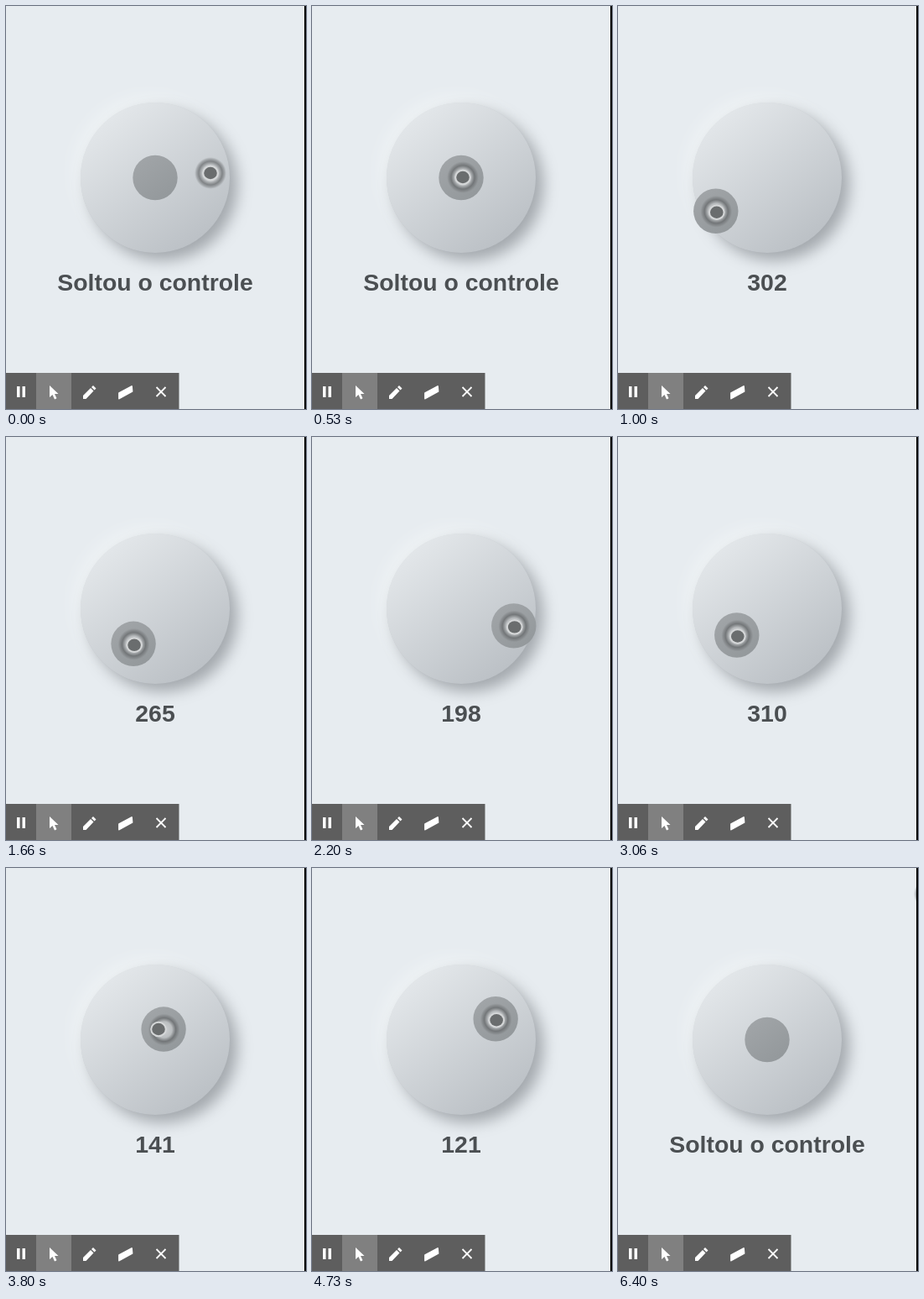
An HTML page with a canvas for the animation above (7060 ms loop, 358 by 480 pixels).

```html
<!DOCTYPE html>
<html lang="pt">
<head>
<meta charset="utf-8">
<style>
  html, body { margin: 0; width: 100%; height: 100%; overflow: hidden; background: #e7ecf0; }
  canvas { display: block; }
</style>
</head>
<body>
<canvas id="stage" width="358" height="480"></canvas>
<script>
const ctx = document.getElementById('stage').getContext('2d');
const LOOP = 7060;
const CX = 178, CY = 204.5;

// Knob turns: [step, reading in degrees, distance from centre]; a step is 1/15 s.
const turns = [
  [8, 90, 0], [14, 302, 62], [15, 327, 73], [22, 192, 42],
  [32, 558, 66], [33, 558, 66], [45, 1030, 51], [46, 1039, 48],
  [56, 1221, 44], [57, 1209, 16], [65, 1202, 0], [66, 1202, 8],
  [70, 1201, 29], [71, 1229, 48], [75, 1229, 48], [78, 1229, 0]
];

const clamp01 = u => Math.min(1, Math.max(0, u));
const mix = (a, b, u) => a + (b - a) * u;

function polarAt(step) {
  const i = turns.findIndex(turn => turn[0] > step);
  if (i < 1) return { reading: 0, radius: 0 };
  const [start, fromReading, fromRadius] = turns[i - 1];
  const [end, toReading, toRadius] = turns[i];
  const u = (step - start) / (end - start);
  return { reading: mix(fromReading, toReading, u), radius: mix(fromRadius, toRadius, u) };
}

function knobAt(step) {
  const { reading, radius } = polarAt(step);
  const angle = reading * Math.PI / 180;
  return { x: CX - radius * Math.cos(angle), y: CY - radius * Math.sin(angle) };
}

function glide(step, start, end, x0, y0, x1, y1) {
  const u = clamp01((step - start) / (end - start));
  const eased = u * u * (3 - 2 * u);
  return { x: mix(x0, x1, eased), y: mix(y0, y1, eased) };
}

function pointerAt(step, knob) {
  if (step < 9) return glide(step, 3, 8, 244, 199, 180, 204);
  if (step > 56 && step < 66) return glide(step, 57, 65, 182, 192, 182, 200);
  if (step > 71) return glide(step, 86, 96, 219, 181, 372, 31);
  return { x: knob.x + 1, y: knob.y + 1.5 };
}

function ellipse(x, y, rx, ry, fill) {
  ctx.fillStyle = fill;
  ctx.beginPath();
  ctx.ellipse(x, y, rx, ry, 0, 0, 7);
  ctx.fill();
}

function diagonal(x, y, r, from, to) {
  const g = ctx.createLinearGradient(x - r * .6, y - r * .8, x + r * .6, y + r * .8);
  g.addColorStop(0, from);
  g.addColorStop(1, to);
  return g;
}

function polygon(...points) {
  ctx.beginPath();
  for (let i = 0; i < points.length; i += 2) ctx.lineTo(points[i], points[i + 1]);
  ctx.closePath();
  ctx.fill();
}

function drawBase() {
  const fill = diagonal(CX, CY, 89, '#e2e6e9', '#bcc1c6');
  for (const [offset, color] of [[-7, '#eff3f5'], [9, '#a2a7ac']]) {
    ctx.save();
    ctx.shadowColor = color;
    ctx.shadowBlur = 18;
    ctx.shadowOffsetX = ctx.shadowOffsetY = offset;
    ellipse(CX, CY, 89, 89.5, fill);
    ctx.restore();
  }
}

function drawPointer(dot, ring) {
  const g = ctx.createRadialGradient(ring.x, ring.y, 0, ring.x, ring.y, 19);
  g.addColorStop(0, 'rgba(215,218,220,.9)');
  g.addColorStop(.5, 'rgba(195,198,200,.8)');
  g.addColorStop(.74, 'rgba(98,101,103,.7)');
  g.addColorStop(.87, 'rgba(110,113,115,.45)');
  g.addColorStop(1, 'rgba(120,123,125,0)');
  ellipse(ring.x, ring.y, 19, 19, g);
  ellipse(dot.x, dot.y, 9.8, 9.2, '#d5d7d8');
  ellipse(dot.x, dot.y, 7.8, 7.2, '#6a6d6e');
}

function drawToolbar() {
  ctx.fillStyle = '#5e5e5e';
  ctx.fillRect(0, 437, 206.5, 43);
  ctx.fillStyle = '#808080';
  ctx.fillRect(36, 437, 42, 43);
  ctx.fillStyle = ctx.strokeStyle = '#fff';
  ctx.fillRect(13, 453, 3.5, 13);
  ctx.fillRect(19.5, 453, 3.5, 13);
  polygon(52, 452, 52, 466, 55.5, 463, 58, 468.5, 60.5, 467.3, 58, 462, 62.5, 462);
  polygon(92, 468, 92, 464, 101, 455, 104.5, 458.5, 95.5, 468);
  polygon(102, 454, 104, 452, 107.5, 455.5, 105.5, 457.5);
  ctx.lineWidth = 1.8;
  ctx.lineJoin = 'round';
  polygon(135, 461, 150, 453, 150.5, 459, 135, 467.5);
  ctx.stroke();
  ctx.beginPath();
  ctx.moveTo(179.5, 454); ctx.lineTo(190.5, 465);
  ctx.moveTo(190.5, 454); ctx.lineTo(179.5, 465);
  ctx.stroke();
}

function draw(step) {
  const held = (step > 8 && step < 58) || (step > 65 && step < 76);
  const knob = knobAt(step);
  const dot = pointerAt(step, knob);
  const ring = held ? { x: knob.x + .5, y: knob.y + .5 } : dot;

  ctx.fillStyle = '#e7ecf0';
  ctx.fillRect(0, 0, 358, 480);
  drawBase();
  ellipse(knob.x, knob.y, 26.7, 26.7, diagonal(knob.x, knob.y, 26, '#a0a4a7', '#94999c'));
  drawPointer(dot, ring);

  // The reading trails the knob by one step and freezes while it rests.
  const label = held
    ? Math.round(polarAt(Math.min(step - 1, 70)).reading) % 360
    : 'Soltou o controle';
  ctx.font = 'bold 28.4px "Liberation Sans", Arial, sans-serif';
  ctx.textAlign = 'center';
  ctx.fillStyle = '#4b4f52';
  ctx.fillText(label, CX, 339);

  drawToolbar();
  ctx.fillStyle = '#000';
  ctx.fillRect(356, 0, 2, 480);
}

function tick() {
  const t = performance.now() % LOOP;
  draw(Math.ceil((Math.floor(t / 10) + 1) * 3 / 20) - 1);
  requestAnimationFrame(tick);
}
tick();
</script>
</body>
</html>
```
